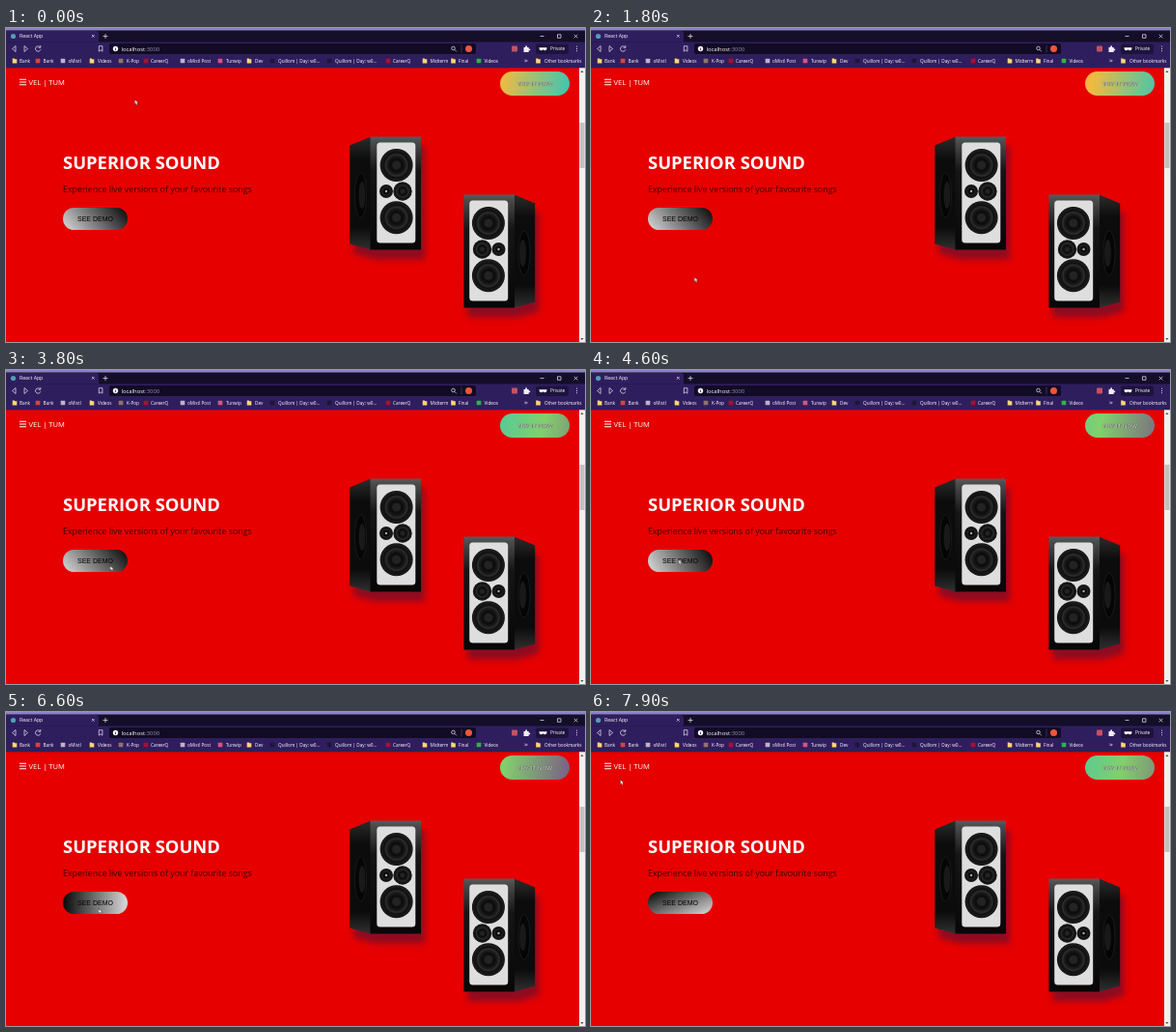
These frames come from a looping animation (600 by 325 pixels, 8 s). An HTML page:

```html
<!DOCTYPE html>
<html lang="en">
<head>
<meta charset="utf-8">
<title>React App</title>
<style>
@property --turn { syntax: "<angle>"; inherits: false; initial-value: 50deg; }
html, body { margin: 0; width: 100%; height: 100%; overflow: hidden; background: #e60000; }
svg { display: block; position: absolute; left: 0; top: 0; }
text { font-family: "Open Sans", "Noto Sans", sans-serif; fill: #fff; }
.ui text { font-size: 4.7px; font-weight: 500; fill: #fff; }
.ui .line { fill: none; stroke: #f0edf8; stroke-width: .7; }
.shadow { filter: drop-shadow(4px 10px 3px rgba(70, 20, 60, .55)); }
.pill {
  position: absolute; box-sizing: border-box; border-radius: 13px;
  font-family: "Liberation Sans", Arial, sans-serif; text-align: center; white-space: nowrap;
}
.try {
  left: 512px; top: 45px; width: 72px; height: 25px; line-height: 25px;
  font-size: 6.2px; color: #dfe3e3; text-shadow: 0 0 1px #333, .4px .4px .6px #444;
  background: linear-gradient(100deg, #e5487c, #f3ba40, #3ec6b0, #82d06c, #7b5a86) 0 0 / 400% 100%;
  animation: flow 8s infinite ease-in-out;
}
.demo {
  left: 59px; top: 186px; width: 67px; height: 23px; line-height: 23px;
  font-size: 7px; color: #000;
  background: linear-gradient(var(--turn), #dcdcdc, #050505);
  animation: spin 8s infinite linear;
}
.cursor { animation: roam 8s infinite linear; }
@keyframes flow {
  0% { background-position: 33% 0; }
  11.25% { background-position: 0% 0; }
  33.75% { background-position: 60% 0; animation-timing-function: linear; }
  47.5% { background-position: 80% 0; animation-timing-function: ease-out; }
  67.5% { background-position: 99% 0; }
  75% { background-position: 100% 0; }
  82.5% { background-position: 99% 0; animation-timing-function: ease-in; }
  98.75%, 100% { background-position: 83% 0; }
}
@keyframes spin {
  0%, 47.5% { --turn: 50deg; }
  67.5% { --turn: 76deg; }
  82.5% { --turn: -88deg; }
  90% { --turn: -60deg; }
  98.75%, 100% { --turn: -24deg; }
}
@keyframes roam {
  0% { transform: translate(133px, 73.5px); animation-timing-function: ease-in-out; }
  11.25% { transform: translate(149px, 279px); animation-timing-function: ease-in-out; }
  33.75% { transform: translate(64.5px, 235.5px); animation-timing-function: ease-in-out; }
  47.5% { transform: translate(107.5px, 202px); animation-timing-function: ease-in-out; }
  67.5% { transform: translate(73px, 189px); animation-timing-function: ease-in-out; }
  82.5% { transform: translate(95.5px, 203px); }
  90% { transform: translate(80px, 192px); animation-timing-function: ease-in-out; }
  98.75%, 100% { transform: translate(30px, 69.5px); }
}
</style>
</head>
<body>
<svg width="600" height="325" viewBox="0 0 600 325">
  <defs>
    <linearGradient id="side" x1="0" y1="0" x2="0" y2="1">
      <stop offset="0" stop-color="#2c2c2c"/><stop offset=".2" stop-color="#0c0c0c"/>
      <stop offset=".8" stop-color="#0b0b0b"/><stop offset="1" stop-color="#303030"/>
    </linearGradient>
    <linearGradient id="front" x1="0" y1="0" x2="0" y2="1">
      <stop offset="0" stop-color="#5a5a5a"/><stop offset=".05" stop-color="#4a4a4a"/>
      <stop offset=".3" stop-color="#151515"/><stop offset="1" stop-color="#070707"/>
    </linearGradient>
    <radialGradient id="dish">
      <stop offset="0" stop-color="#3a3a3a"/><stop offset=".3" stop-color="#1b1b1b"/>
      <stop offset=".38" stop-color="#0b0b0b"/><stop offset=".7" stop-color="#262626"/>
      <stop offset=".8" stop-color="#101010"/><stop offset="1" stop-color="#1d1d1d"/>
    </radialGradient>
    <g id="cone">
      <circle r="17" fill="#141414"/><circle r="16.2" fill="url(#dish)"/>
      <circle r="11" fill="none" stroke="#333" stroke-width=".7"/>
      <circle r="5" fill="#232323" stroke="#0a0a0a" stroke-width=".8"/>
    </g>
    <g id="speaker">
      <path d="M356.300 121.500 L378 112.500 V229.500 L356.300 223.500 Z" fill="url(#side)"/>
      <ellipse cx="367.500" cy="173" rx="6" ry="23" fill="#050505" stroke="#222" stroke-width=".7"/>
      <ellipse cx="369" cy="173" rx="3.500" ry="14" fill="#191919"/>
      <path d="M377.500 112.500 H430 V229.500 H377.500 Z" fill="url(#front)"/>
      <rect x="384.300" y="118.500" width="40" height="104" rx="3.500" fill="#dedede"/>
      <use href="#cone" x="404.600" y="142"/>
      <use href="#cone" x="404.600" y="196.300"/>
      <use href="#cone" transform="translate(411 169) scale(.57)"/>
      <circle cx="394" cy="169" r="7" fill="#151515"/>
      <circle cx="394" cy="169" r="4" fill="#0a0a0a" stroke="#333" stroke-width=".6"/>
      <circle cx="394" cy="169" r="1.200" fill="#aaa"/>
    </g>
    <g id="folder"><path d="M-2.300 -2.500 H-.3 L.4 -1.800 H2.300 V2.500 H-2.300 Z" fill="#f8d775"/></g>
  </defs>

  <rect width="600" height="325" fill="#e60000"/>

  <g class="ui">
    <rect width="600" height="41.300" fill="#2f1e5e"/>
    <rect width="600" height="14.500" fill="#150e29"/>
    <path d="M0 14.500 V3 H93 Q96 3 96 6 V14.500 Z" fill="#2f1e5e"/>
    <rect width="600" height="2.500" fill="#8b82c9"/>
    <circle cx="7.500" cy="8.500" r="2.600" fill="#4f9fb0"/>
    <text x="14" y="10.400" font-weight="600" style="font-size:5.200px">React App</text>
    <path class="line" d="M89 7 l2.600 2.600 m0 -2.600 l-2.600 2.600 M100.500 8.500 h5 m-2.500 -2.500 v5 M553.500 8.500 h4 M571.500 6.800 h3.500 v3.500 h-3.500 Z M588.800 6.800 l3.500 3.500 m0 -3.500 l-3.500 3.500"/>

    <path class="line" d="M10 18.500 l-3.500 3 l3.500 3 Z M19 18.500 l3.500 3 l-3.500 3 Z M35.300 19.800 a2.700 2.700 0 1 0 .5 2.500 M35.800 18 v2.300 h-2.300 M96.300 18.700 h3.600 v5.500 l-1.800 -1.400 l-1.800 1.400 Z"/>
    <rect x="107" y="16" width="380" height="11" rx="2" fill="#120b25"/>
    <circle cx="113.500" cy="21.500" r="2.700" fill="#f4f2fa"/>
    <path d="M113.500 20 v.4 m0 .7 v2" stroke="#120b25" stroke-width=".7"/>
    <text x="119.500" y="23.600" style="font-size:5.900px">localhost<tspan fill="#9990b5">:3000</tspan></text>
    <circle class="line" cx="463.500" cy="21" r="1.800"/>
    <path class="line" d="M465 22.500 l1.800 1.800"/>
    <path d="M472 17.500 v8" stroke="#554779" stroke-width=".6"/>
    <circle cx="479.500" cy="21.500" r="3.500" fill="#ee563a"/>
    <rect x="524" y="18.500" width="6" height="6" rx="1" fill="#c45263"/>
    <path d="M536.500 20 h1.700 q-.5 -1.800 .9 -1.800 t.9 1.800 h1.700 v1.500 q1.600 -.3 1.600 .9 t-1.600 .9 v1.700 h-5.200 Z" fill="#f0edf8"/>
    <rect x="549" y="16.500" width="34" height="10.500" rx="2" fill="#1d133d"/>
    <path d="M552.500 20.300 h8 q0 3 -2 3 t-2 -1.500 q0 1.500 -2 1.500 t-2 -3 Z" fill="#fff"/>
    <text x="564" y="23.300">Private</text>
    <path d="M591.500 18.700 v.9 m0 1.400 v.9 m0 1.400 v.9" stroke="#fff" stroke-width=".9"/>
    <g id="marks"></g>
    <path class="line" d="M537.500 32.700 l1.100 1.200 l-1.100 1.200 m1.600 -2.400 l1.100 1.200 l-1.100 1.200"/>
  </g>

  <path d="M14 53.300 h7 m-7 2.700 h7 m-7 2.700 h7" stroke="#fff" stroke-width="1.100"/>
  <text x="23.500" y="58.600" font-size="7.600">VEL | TUM</text>
  <text x="59" y="146.200" font-size="18.400" font-weight="700">SUPERIOR SOUND</text>
  <text x="59" y="170.300" font-size="8.860" style="fill:#3a0202">Experience live versions of your favourite songs</text>

  <g class="shadow"><use href="#speaker"/></g>
  <g class="shadow"><use href="#speaker" transform="translate(904.500 60) scale(-1 1)"/></g>

  <rect x="594" y="41.300" width="6" height="283.700" fill="#f1f1f1"/>
  <rect x="594.500" y="98" width="5" height="47" fill="#c1c1c1"/>
  <path d="M595.200 46 l1.700 -2 l1.700 2 Z M595.200 321 l1.700 2 l1.700 -2 Z" fill="#505050"/>
</svg>

<div class="pill try">TRY IT NOW</div>
<div class="pill demo">SEE DEMO</div>

<svg class="cursor" width="6" height="8" viewBox="0 0 6 8">
  <path d="M.4 .4 V5.400 L1.600 4.500 L2.400 6.300 L3.400 5.900 L2.700 4.200 H4.200 Z" fill="#fff" stroke="#1a0a0a" stroke-width=".4"/>
</svg>

<script>
// Each bookmark: icon centre, label start, label, icon colour (a folder when absent).
const marks = [
  [9, 14, "Bank"], [33, 38.5, "Bank", "#d8433c"], [59, 64.5, "oMistl", "#b9b4c6"],
  [89, 95, "Videos"], [119, 125, "K-Pop", "#8d7565"], [145, 150, "CareerQ", "#a8102b"],
  [183, 188, "oMistl Post", "#b9b4c6"], [222, 228, "Tunwip", "#d8547c"], [252, 258, "Dev"],
  [276, 282, "Quillom | Day: w0...", "#1b1638"], [335, 341, "Quillom | Day: w0...", "#1b1638"],
  [396, 401, "CareerQ", "#a8102b"], [434, 439.5, "Midterm"], [463.5, 469, "Final"],
  [490, 495.5, "Videos", "#2fb344"], [551.5, 558, "Other bookmarks"]
];
document.getElementById("marks").innerHTML = marks.map(([icon, x, label, color]) =>
  (color
    ? `<rect x="${icon - 2.3}" y="31.700" width="4.600" height="4.600" rx=".6" fill="${color}"/>`
    : `<use href="#folder" x="${icon}" y="34"/>`) +
  `<text x="${x}" y="35.800">${label}</text>`).join("");
</script>
</body>
</html>
```
